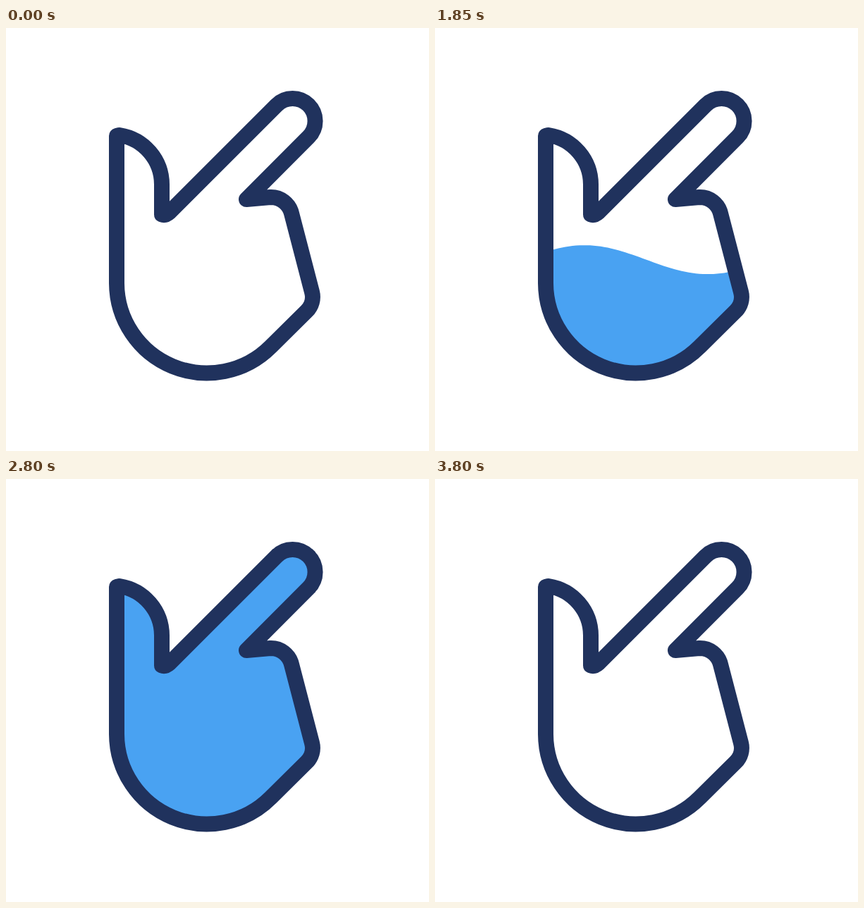
These frames come from a looping animation (600 by 600 pixels, 4.15 s). An HTML page:

```html
<!DOCTYPE html>
<html lang="en">
<head>
<meta charset="utf-8">
<title>Pointing hand</title>
<style>
  html, body { margin: 0; width: 100%; height: 100%; overflow: hidden; background: #fff; }
  svg { display: block; width: 100%; height: 100%; }
</style>
</head>
<body>
<svg viewBox="0 0 600 600">
  <defs>
    <path id="hand" d="M157 153 V362 A128 128 0 0 0 375.5 452 L426.5 401.5 A28 28 0 0 0 434 374.5
      L405 263 A30 30 0 0 0 375 240 L341 243 L429.2 154.6 A32 32 0 0 0 383.8 109.4
      L232 261.2 Q226 266.5 221 264.5 V222 A71 71 0 0 0 161 152 Z"/>
    <clipPath id="inside"><use href="#hand"/></clipPath>
    <path id="arrow" d="M360 82 H264 M304.5 41.2 L263.7 82 L304.5 122.8"/>
  </defs>
  <path id="water" clip-path="url(#inside)" fill="#49a2f2"/>
  <use href="#hand" fill="none" stroke="#20325d" stroke-width="22" stroke-linejoin="round"/>
  <g id="arrows" fill="none" stroke="#20325d" stroke-width="15.4" opacity="0">
    <use href="#arrow"/>
    <use href="#arrow" transform="rotate(180 405.8 146.2)"/>
  </g>
</svg>
<script>
  const LOOP = 4150, STEP = 50;
  const AMP = 20.5, WAVE = 350;
  const FILL = 1200, FULL = 2800, DRAIN = 3050, EMPTY = 3800;

  // [step, mean level, crest x]
  const rise = [
    [0, 449.5, 171], [8, 375, 413], [19, 273, 741],
    [22, 244, 831], [26, 185.5, 965], [32, 98, 1157]
  ];
  const drain = [[0, 480, 185], [2, 429, 305], [15, 98, 1085]];

  const water = document.getElementById('water');
  const arrows = document.getElementById('arrows');

  function sample(keys, n) {
    let i = 1;
    while (i < keys.length - 1 && n > keys[i][0]) i++;
    const a = keys[i - 1], b = keys[i];
    const f = (n - a[0]) / (b[0] - a[0]);
    return [a[1] + (b[1] - a[1]) * f, a[2] + (b[2] - a[2]) * f];
  }

  // Area between the wave and a horizontal edge
  function area([level, crest], edge) {
    let d = `M140 ${edge}`;
    for (let x = 140; x <= 460; x += 5) {
      const y = level - AMP * Math.cos(2 * Math.PI * (x - crest) / WAVE);
      d += `L${x} ${y.toFixed(2)}`;
    }
    return d + `L460 ${edge}Z`;
  }

  function shape(t) {
    if (t < FILL || t >= EMPTY) return '';
    if (t >= DRAIN) return area(sample(drain, (t - DRAIN) / STEP), 0);
    if (t >= FULL) return 'M140 80H460V510H140Z';
    return area(sample(rise, (t - FILL) / STEP), 600);
  }

  function draw(now) {
    const t = Math.floor((now % LOOP) / STEP) * STEP;
    water.setAttribute('d', shape(t));
    const p = (t - 2300) / 500;
    arrows.setAttribute('opacity', p > 0 && p < 1 ? 0.98 * Math.sin(Math.PI * p) : 0);
  }

  const start = performance.now();
  function tick() {
    draw(performance.now() - start);
    requestAnimationFrame(tick);
  }
  tick();
</script>
</body>
</html>
```
